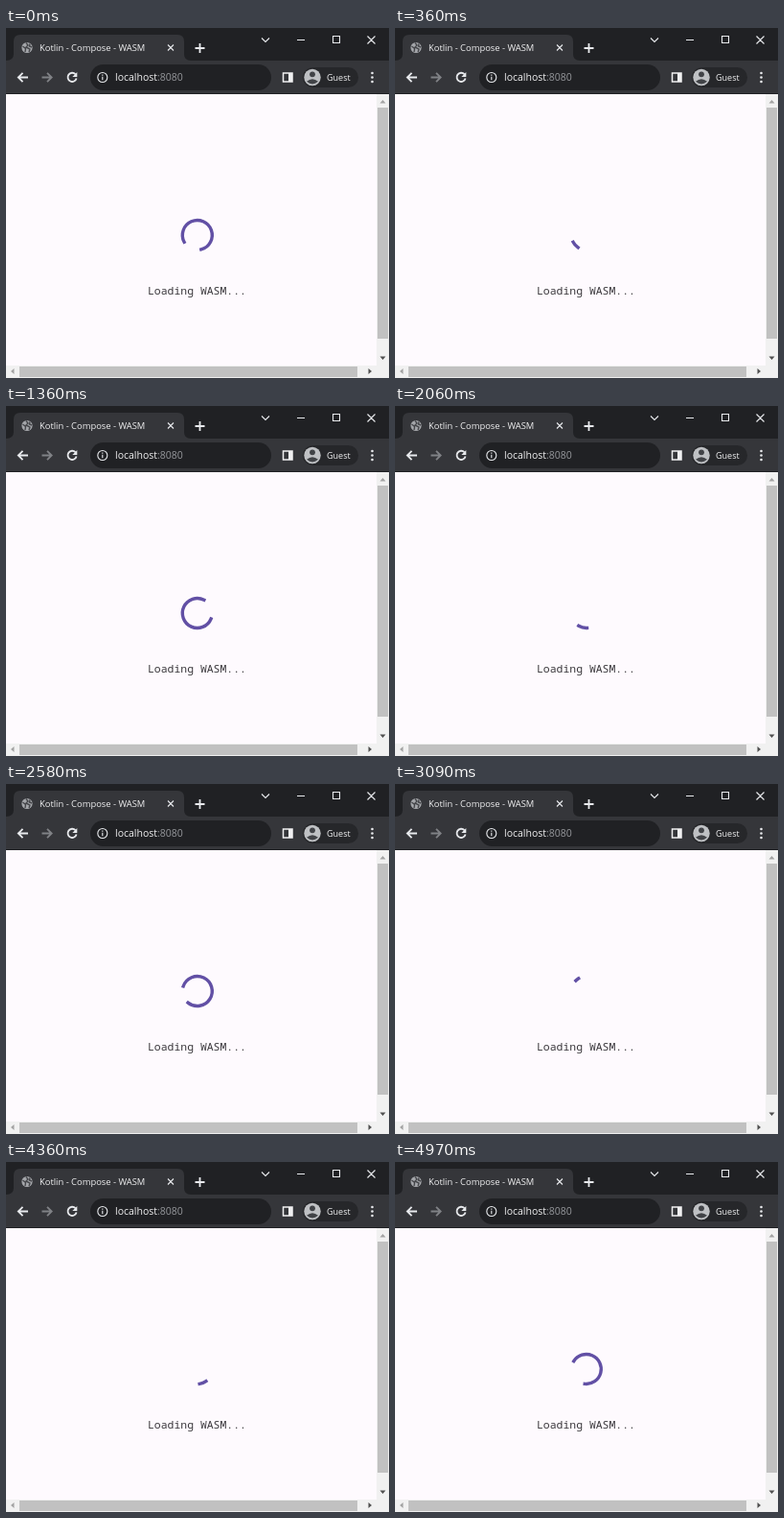
Recreate the animation shown at these times as an HTML page. Size 400x365 px, loop 5 s.

```html
<!DOCTYPE html>
<html lang="en">
<head>
<meta charset="utf-8">
<title>Loading</title>
<style>
  html, body { margin: 0; width: 100%; height: 100%; overflow: hidden; background: #fefafe; }
  svg { display: block; width: 400px; height: 365px; }
  text { font-family: "Open Sans", "Noto Sans", sans-serif; fill: #f1f1f2; }
  .mono { font-family: "Noto Sans Mono", "DejaVu Sans Mono", monospace; font-size: 11.45px; fill: #3a383c; }
  .line { fill: none; stroke: #e8eaed; stroke-width: 1.1; }
  .bold { stroke-width: 1.8; }
  .dim { stroke: #808286; }
</style>
</head>
<body>
<svg viewBox="0 0 400 365">
  <rect width="400" height="365" fill="#fefafe"/>

  <!-- Tab strip and toolbar -->
  <rect width="400" height="69" fill="#202124"/>
  <path d="M0 34 Q8 34 8 27 V14 Q8 7 15 7 H179 Q186 7 186 14 V27 Q186 34 193 34 H400 V68 H0Z" fill="#35363a"/>
  <circle cx="22" cy="20.5" r="5.6" fill="#a4a6aa"/>
  <path d="M17.5 19 L20.5 21.5 L20 25 M21 15.5 L23 18 L21 20 L25 22 L24 25 M25 16.5 L24.5 19 L27 20" fill="none" stroke="#45464a" stroke-width="1.4"/>
  <text x="35" y="24" font-size="9.4">Kotlin - Compose - WASM</text>
  <path class="line" stroke-width="1.3" d="M169 17.5 l6 6 m0 -6 l-6 6"/>
  <path class="line bold" d="M197.5 21 h10 m-5 -5 v10"/>
  <path class="line" d="M267 10.5 l4 4 l4 -4"/>
  <path class="line" d="M304 12.5 h8 M341.500 8.500 h7 v7 h-7 z M377.500 8.500 l8 8 m0 -8 l-8 8"/>

  <path class="line bold" d="M23 51.500 H13 M17.500 46.800 L12.800 51.500 L17.500 56.200"/>
  <path class="line bold dim" d="M37.500 51.500 H47.500 M43 46.800 L47.700 51.500 L43 56.200"/>
  <path class="line bold" d="M72.500 48.200 A4.600 4.600 0 1 0 73.600 52.500"/>
  <path d="M74.300 46 V51 H69.300Z" fill="#e8eaed"/>

  <rect x="88" y="38" width="189" height="27" rx="13.5" fill="#202124"/>
  <circle class="line" cx="100.800" cy="51.500" r="5" stroke="#b9bbbf"/>
  <path class="line" d="M100.800 50.800 v3.500 M100.800 48.500 v1.200"/>
  <text x="114" y="55.300" font-size="10.5">localhost<tspan fill="#96989c">:8080</tspan></text>

  <rect x="289.500" y="47" width="9.500" height="9" fill="none" stroke="#f1f1f2" stroke-width="1.5"/>
  <rect x="295" y="47" width="4" height="9" fill="#f1f1f2"/>
  <rect x="310" y="41" width="58" height="21" rx="10.5" fill="#26272a"/>
  <circle cx="320" cy="51.500" r="8.700" fill="#bfc1c4"/>
  <circle cx="320" cy="48.300" r="2.900" fill="#414347"/>
  <path d="M314 55.800 Q320 50.800 326 55.800 Q320 61 314 55.800Z" fill="#414347"/>
  <text x="335" y="55" font-size="9">Guest</text>
  <g fill="#e8eaed">
    <circle cx="382.500" cy="47" r="1.300"/>
    <circle cx="382.500" cy="51.500" r="1.300"/>
    <circle cx="382.500" cy="56" r="1.300"/>
  </g>

  <!-- Scrollbars -->
  <path d="M387 69 H400 V365 H0 V352 H387Z" fill="#f1f1f1"/>
  <path d="M388 83 h11 v241 h-11z M14 353 h353 v11 h-353z" fill="#c1c1c1"/>
  <path d="M390.500 78.500 l3 -3.500 l3 3.500z M8.500 355 l-3.500 3 l3.500 3z" fill="#a3a3a3"/>
  <path d="M390.500 342.500 l3 3.500 l3 -3.500z M378.500 355 l3.500 3 l-3.500 3z" fill="#505050"/>

  <path id="spinner" fill="none" stroke="#6250a5" stroke-width="3.4" stroke-linecap="square"/>
  <text class="mono" x="148" y="277.500">Loading WASM...</text>
</svg>
<script>
  const LOOP = 5000, CYCLE = 1332, HALF = CYCLE / 2;
  const START_PHASE = 2 * CYCLE + 729;
  const BASE_TURN = 286, JUMP = 290, CYCLE_TURN = 216;
  const CX = 199.8, CY = 216, RADIUS = 15.5, CAP = 1.7 / RADIUS * 180 / Math.PI;
  const spinner = document.getElementById('spinner');

  // cubic-bezier(0.4, 0, 0.2, 1), solved by bisection
  function ease(x) {
    if (x <= 0) return 0;
    if (x >= 1) return 1;
    let low = 0, high = 1, u = 0.5;
    for (let i = 0; i < 24; i++) {
      u = (low + high) / 2;
      const v = 1 - u;
      if (1.2 * u * v * v + 0.6 * u * u * v + u * u * u < x) low = u;
      else high = u;
    }
    return u * u * (3 - 2 * u);
  }

  function point(degrees) {
    const a = degrees * Math.PI / 180;
    return `${(CX + RADIUS * Math.cos(a)).toFixed(3)} ${(CY + RADIUS * Math.sin(a)).toFixed(3)}`;
  }

  function draw(time) {
    const elapsed = START_PHASE + time % LOOP;
    const phase = elapsed % CYCLE;
    const turn = Math.floor(elapsed / CYCLE) * CYCLE_TURN + phase / CYCLE * BASE_TURN - 90;
    const head = JUMP * ease(phase / HALF);
    const tail = JUMP * ease((phase - HALF) / HALF);
    const sweep = Math.max(head - tail, 0.1);
    const start = turn + tail + CAP;
    spinner.setAttribute('d',
      `M${point(start)} A${RADIUS} ${RADIUS} 0 ${sweep > 180 ? 1 : 0} 1 ${point(start + sweep)}`);
  }

  const origin = performance.now();
  function tick() {
    draw(performance.now() - origin);
    requestAnimationFrame(tick);
  }
  tick();
</script>
</body>
</html>
```
